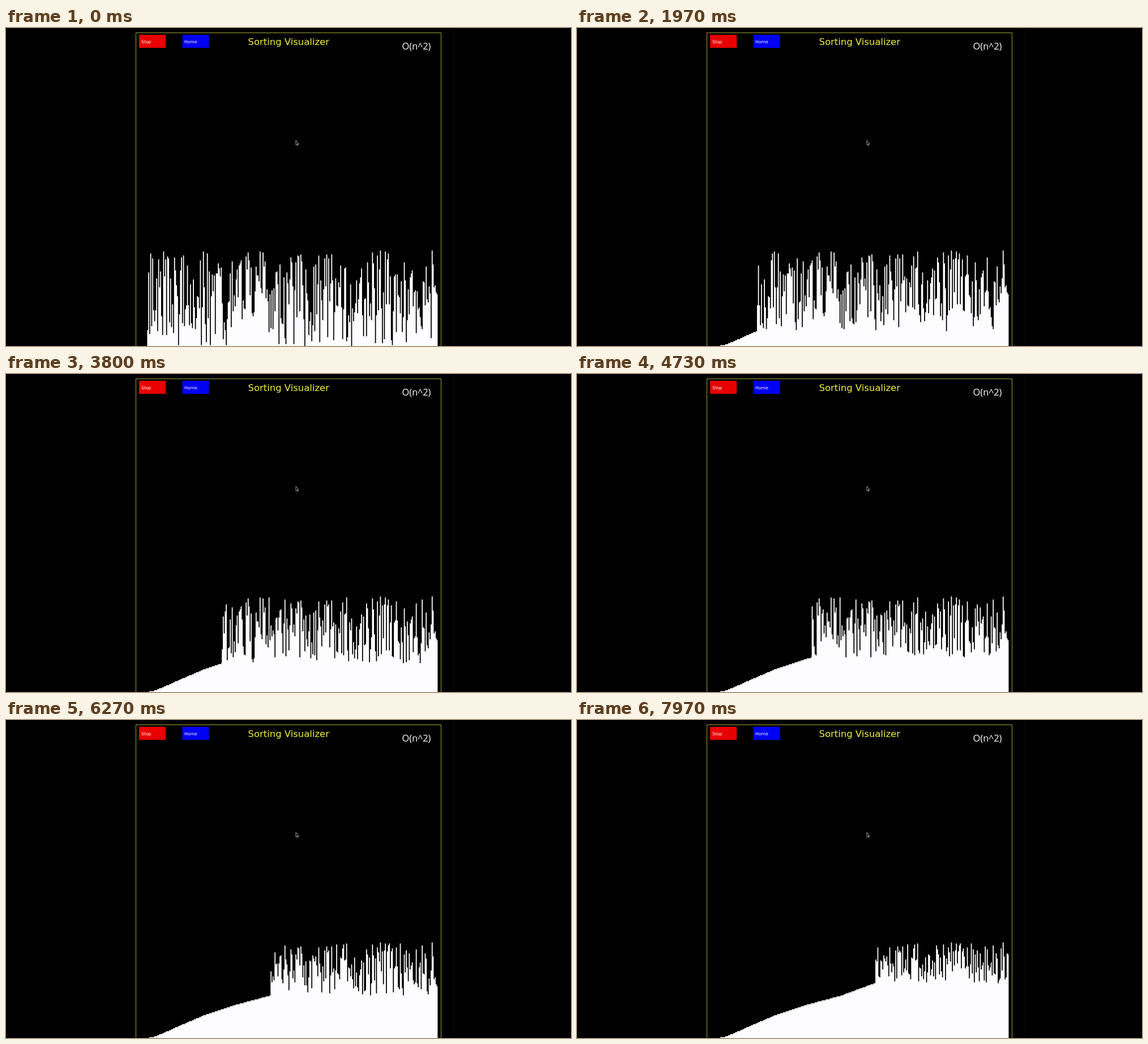
These frames come from a looping animation (998x561 px, 8000 ms). An HTML page:

```html
<!DOCTYPE html>
<html lang="en">
<head>
<meta charset="utf-8">
<title>Sorting Visualizer</title>
<style>
  html, body { margin: 0; width: 100%; height: 100%; overflow: hidden; background: #000; }
  svg { display: block; width: 998px; height: 561px; }
  text { font-family: "DejaVu Sans", sans-serif; fill: #fff; }
  .title { font-size: 16.45px; fill: #f0f03a; }
  .order { font: 16.45px "Open Sans", sans-serif; }
  .label { font-size: 7.7px; }
</style>
</head>
<body>
<svg viewBox="0 0 998 561">
  <path d="M790.5 0V561" stroke="#0b0b0b"/>
  <path d="M229.5 561V8.5H768.5V561" fill="none" stroke="#a3a336"/>
  <rect x="235" y="12" width="47" height="23" fill="#e80000"/>
  <rect x="311.5" y="12" width="47" height="23" fill="#0000f2"/>
  <text class="label" x="239" y="26.5">Stop</text>
  <text class="label" x="315" y="26.5">Home</text>
  <text class="title" x="427.5" y="30">Sorting Visualizer</text>
  <text class="order" x="699.5" y="38">O(n^2)</text>
  <path d="M512 198.3V206.3L513.8 204.8L515 207.3L516 206.8L514.9 204.3H517Z" fill="#000" stroke="#c8c8c8" stroke-width=".8"/>
  <path id="bars" fill="#fdfdff"/>
</svg>
<script>
const LOOP = 8000, STEP = 50.4;
const COUNT = 292, PITCH = 1.757, LEFT = 249.4, BASE = 561.2;

// Key points on the outline of the fully sorted bars: x, top.
const profile = [[249, 561], [264, 558], [350, 521], [400, 504], [467, 486], [527, 464], [763, 392]];

function sortedValue(i) {
  const x = LEFT + (i + 0.5) * PITCH;
  const k = profile.findIndex(point => point[0] >= x);
  const [x0, y0] = profile[k - 1], [x1, y1] = profile[k];
  const top = y0 + (y1 - y0) * (x - x0) / (x1 - x0);
  return Math.round((BASE - top) / PITCH);
}

function seededRandom(seed) {
  return () => {
    seed = (seed + 0x6D2B79F5) | 0;
    let r = Math.imul(seed ^ seed >>> 15, 1 | seed);
    r ^= r + Math.imul(r ^ r >>> 7, 61 | r);
    return ((r ^ r >>> 14) >>> 0) / 4294967296;
  };
}

function shuffle(a, random) {
  for (let i = a.length - 1; i > 0; i--) {
    const j = Math.floor(random() * (i + 1));
    [a[i], a[j]] = [a[j], a[i]];
  }
  return a;
}

function selectionSort(values, steps) {
  const a = values.slice();
  for (let i = 0; i < steps; i++) {
    let min = i;
    for (let j = i + 1; j < a.length; j++) if (a[j] < a[min]) min = j;
    [a[i], a[min]] = [a[min], a[i]];
  }
  return a;
}

const start = shuffle(Array.from({ length: COUNT }, (_, i) => sortedValue(i)), seededRandom(11));
const bars = document.getElementById("bars");
let shown = -1;

function draw(now) {
  const steps = Math.round(now % LOOP / STEP);
  if (steps !== shown) {
    shown = steps;
    const outline = selectionSort(start, steps)
      .map((v, i) => `V${(BASE - v * PITCH).toFixed(2)}H${(LEFT + (i + 1) * PITCH).toFixed(2)}`);
    bars.setAttribute("d", `M${LEFT} 563${outline.join("")}V563Z`);
  }
  requestAnimationFrame(draw);
}
draw(0);
</script>
</body>
</html>
```
